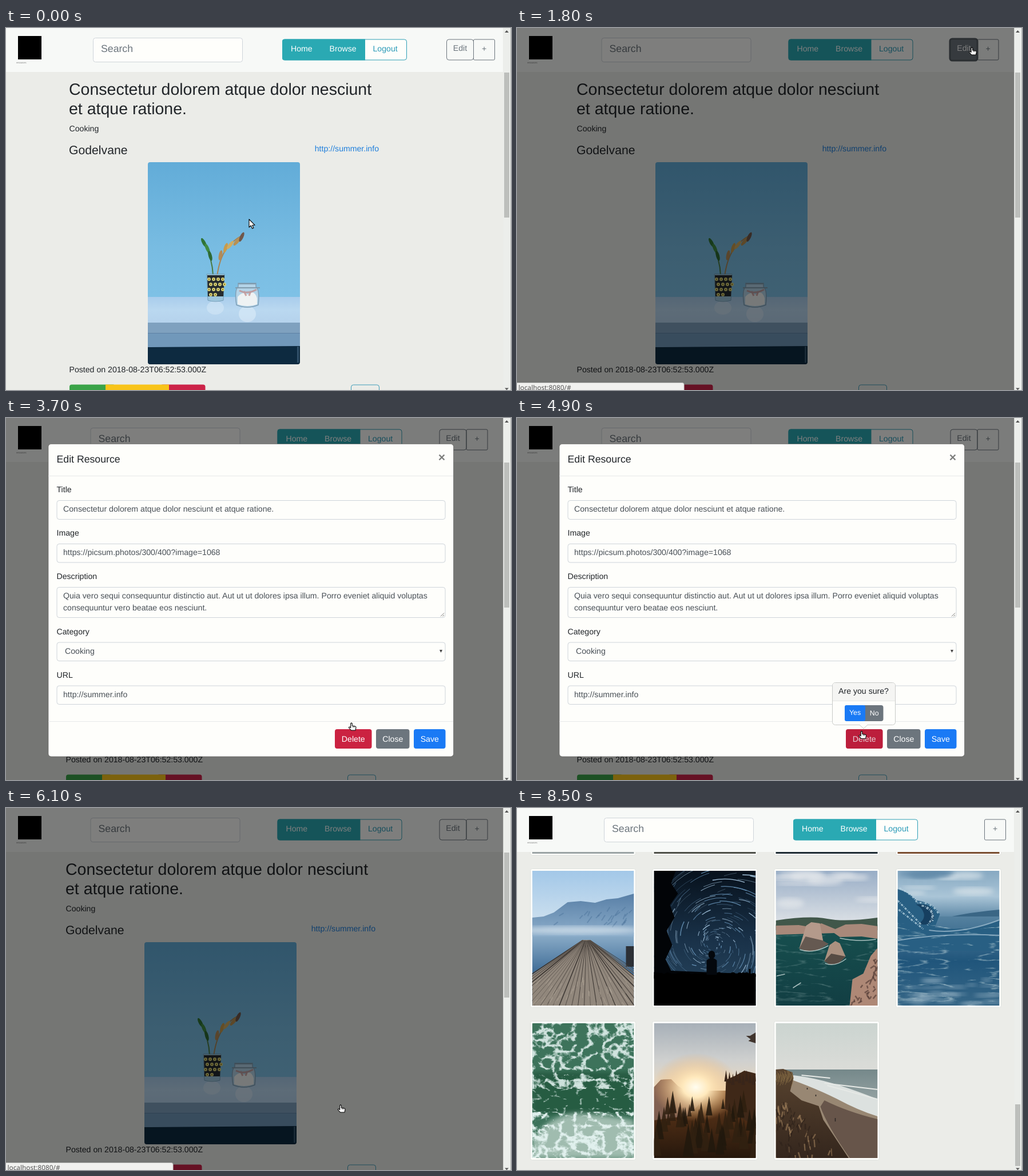
Recreate the animation shown at these times as an HTML page. Size 883 by 634 pixels, loop 8700 ms.

```html
<!DOCTYPE html>
<html lang="en">
<head>
<meta charset="utf-8">
<title>Delete a resource</title>
<style>
html, body { margin: 0; width: 100%; height: 100%; overflow: hidden; background: #ebece8 }
body > svg { display: block; font-family: "Liberation Sans", Arial, sans-serif; text-rendering: geometricPrecision }
.mid { text-anchor: middle }
.end { text-anchor: end }
</style>
</head>
<body>
<script>
const PAPER = '#fefefb', PAGE = '#ebece8', INK = '#212529', GREY = '#6c757d', TEAL = '#2aa9b3';
const BODY = 14.14, LARGE = 17.7;

let seed = 7;
const rnd = (lo = 0, hi = 1) => lo + (hi - lo) * (seed = seed * 16807 % 2147483647) / 2147483647;
const times = (n, fn) => Array.from({ length: n }, (_, i) => fn(i)).join('');

const rect = (x, y, w, h, fill, more = '') => `<rect x="${x}" y="${y}" width="${w}" height="${h}" fill="${fill}" ${more}/>`;
const box = (x, y, w, h, fill, stroke, rx = 4) => rect(x + .5, y + .5, w - 1, h - 1, fill, `rx="${rx}" stroke="${stroke}"`);
const text = (x, y, str, fill = INK, size = BODY, more = '') => `<text x="${x}" y="${y}" font-size="${size}" fill="${fill}" ${more}>${str}</text>`;
const shape = (d, fill, more = '') => `<path d="${d}" fill="${fill}" ${more}/>`;
const line = (d, stroke, width = 1, more = '') => `<path d="${d}" fill="none" stroke="${stroke}" stroke-width="${width}" ${more}/>`;
const oval = (x, y, rx, ry, fill, more = '') => `<ellipse cx="${x}" cy="${y}" rx="${rx}" ry="${ry}" fill="${fill}" ${more}/>`;
const group = (id, content, more = '') => `<g id="${id}" ${more}>${content}</g>`;
const picture = (x, y, w, h, content) => `<svg x="${x}" y="${y}" width="${w}" height="${h}">${content}</svg>`;
const button = (x, y, w, h, fill, label, size = BODY) =>
  rect(x, y, w, h, fill, 'rx="4"') + text(x + w / 2, y + h / 2 + size * .32, label, '#fff', size, 'class="mid"');
const fade = (id, ...colors) => `<linearGradient id="${id}" x2="0" y2="1">${
  colors.map((c, i) => `<stop offset="${i / (colors.length - 1)}" stop-color="${c}"/>`).join('')}</linearGradient>`;
const foam = (id, freq, gain, bias) => `<filter id="${id}" x="0" y="0" width="1" height="1" color-interpolation-filters="sRGB">
  <feTurbulence type="turbulence" baseFrequency="${freq}" numOctaves="4" seed="4"/>
  <feColorMatrix values="0 0 0 0 .88 0 0 0 0 .94 0 0 0 0 .93 ${-gain} 0 0 0 ${bias}"/></filter>`;

const defs = `<defs>
  ${fade('wall', '#62acd8', '#78bce2', '#83c5e9')}${fade('table', '#a9cdec', '#bad8f0', '#b5d2ec')}
  ${fade('haze', '#a3c8e8', '#d6e5f0')}${fade('lake', '#8fb0cb', '#45719a', '#2c5680')}${fade('ridge', '#587fa6', '#8eafcc')}
  ${fade('night', '#07111c', '#193148', '#294861')}${fade('cloudy', '#98adc6', '#dbe0e5')}${fade('bay', '#17504f', '#123e43')}
  ${fade('storm', '#87a9c2', '#aac5d7', '#4c7a9b')}${fade('swell', '#55819f', '#20557b', '#376787')}
  ${fade('dusk', '#a7b0b8', '#cfd0cf', '#f3dcba')}${fade('valley', '#9b6840', '#4c2c15', '#25170c')}
  ${fade('fog', '#cbd4d0', '#dbdcd8')}${fade('sea', '#75888a', '#a3afae')}${fade('dune', '#58432f', '#34261d')}
  <radialGradient id="sun"><stop stop-color="#fffdf0"/><stop offset=".3" stop-color="#ffe9bd"/><stop offset="1" stop-color="#f0b068" stop-opacity="0"/></radialGradient>
  ${foam('surf', '.035 .06', 8, 1.5)}${foam('froth', '.04 .05', 6, 1.9)}${foam('ripple', '.012 .07', 6, 1.1)}
  <filter id="soft"><feGaussianBlur stdDeviation="4"/></filter>
  <filter id="lift"><feDropShadow dx="0" dy="0" stdDeviation="3" flood-opacity=".35"/></filter>
</defs>`;

function plantPhoto() {
  const leaf = (x, y, turn, fill) => oval(0, 0, 3, 9, fill, `transform="translate(${x} ${y}) rotate(${turn})"`);
  return rect(0, 0, 266, 300, 'url(#wall)', 'rx="4"') + rect(0, 300, 266, 54, '#0d2a40', 'rx="4"')
    + rect(0, 236, 266, 46, 'url(#table)') + rect(0, 281, 266, 19, '#7fa1bf') + line('M0 300H266', '#54799c', 1.5)
    + shape('M0 300H266V322L0 324Z', '#7198ba') + rect(261, 323, 3, 28, '#315069')
    + oval(118, 255, 15, 12, '#d8e9f7', 'opacity=".5"') + oval(174, 266, 15, 14, '#dcecf8', 'opacity=".6"')
    + line('M114 198Q113 170 98 139', '#4a7a42', 2) + line('M121 200Q125 170 136 154T165 128', '#a88455', 2)
    + leaf(98, 141, -28, '#2f7436') + leaf(104, 151, -24, '#3f8a43') + leaf(109, 164, -15, '#2d6a35')
    + leaf(127, 163, 12, '#b38a57') + leaf(136, 150, 18, '#c79b4c') + leaf(144, 145, 38, '#d0ad62')
    + leaf(156, 139, 42, '#b99152') + leaf(164, 131, 25, '#70574a')
    + shape('M103 196H134L132 242Q118 246 105 242Z', '#9cc5dc', 'stroke="#6d98b2" opacity=".9"')
    + shape('M104 198H134L132 235H105Z', '#252b2e')
    + times(14, i => oval(107 + i % 4 * 8 + (i >> 2) % 2 * 3, 205 + (i >> 2) * 9, 3, 3, '#d7d27c') + oval(107 + i % 4 * 8 + (i >> 2) % 2 * 3, 205 + (i >> 2) * 9, 1.2, 1.2, '#8d7a25'))
    + shape('M158 212H189V218Q196 224 193 250Q174 258 155 250Q151 224 158 218Z', '#b3d3e7', 'stroke="#7f9fb7" stroke-width="1.5"')
    + shape('M157 236Q166 225 175 232Q186 222 191 238V249Q174 255 157 249Z', '#eef2f3')
    + line('M160 225Q174 232 190 223M168 226L172 234M180 226L177 234', '#c08c8b', 3, 'opacity=".75"') + line('M153 220H196M158 213H189', '#819cae', 2);
}

const dockPhoto = () => rect(0, 0, 178, 110, 'url(#haze)') + rect(0, 108, 178, 130, 'url(#lake)')
  + shape('M0 82L20 80 38 73 62 55 85 53 110 56 130 50 150 48 178 40V115H0Z', 'url(#ridge)')
  + times(24, () => { const x = rnd(45, 175), y = rnd(62, 92); return line(`M${x} ${y}l${rnd(-9, -3)} ${rnd(4, 12)}`, '#456d94', 2, 'opacity=".4"'); })
  + oval(80, 104, 110, 7, '#d0dfea', 'filter="url(#soft)" opacity=".8"')
  + rect(164, 132, 14, 36, '#2c3036') + shape('M88 121H102L178 183V237H0V182Z', '#91877c')
  + times(34, i => line(`M${88 + i * .42} 122L${-85 + i * 11} 237`, i % 3 ? '#625a53' : '#393430', rnd(.6, 1.8)))
  + times(60, () => { const x = rnd(0, 178), y = rnd(185, 237); return line(`M${x} ${y}l${(x - 95) * .1} 9`, '#c6bbaa', .8, 'opacity=".6"'); });

function starPhoto() {
  const cx = 105, cy = 128;
  const trail = () => {
    const r = rnd(8, 215), a = rnd(0, 6.28), b = a + rnd(.12, .5);
    const at = (v, k) => `${(cx + k * Math.cos(v)).toFixed(1)} ${(cy + k * Math.sin(v)).toFixed(1)}`;
    return line(`M${at(a, r)}A${r} ${r} 0 0 1 ${at(b, r * 1.08)}`, rnd() < .5 ? '#a9c9e2' : '#6793b8', rnd(.5, 1.5), `opacity="${rnd(.3, .95).toFixed(2)}"`);
  };
  return rect(0, 0, 178, 237, 'url(#night)') + times(460, trail)
    + shape('M0 0H38L30 22 42 40 28 60 36 82 22 105 32 130 20 155 30 175 178 181V237H0Z', '#020407')
    + times(30, i => oval(i * 6, 183, 5, rnd(2, 6), '#000')) + rect(0, 183, 178, 54, '#000')
    + oval(101, 147, 6, 7, '#04080d') + shape('M92 182V157Q101 148 110 157V182Z', '#04080d') + rect(166, 172, 3, 12, '#000');
}

const coastPhoto = () => rect(0, 0, 178, 90, 'url(#cloudy)')
  + times(9, () => oval(rnd(0, 178), rnd(5, 65), rnd(20, 45), rnd(4, 10), '#e6e9ec', 'filter="url(#soft)" opacity=".65"'))
  + rect(0, 94, 178, 143, 'url(#bay)') + rect(0, 112, 178, 125, '#fff', 'filter="url(#ripple)" opacity=".22"')
  + shape('M0 87Q60 78 90 84T178 82V104H0Z', '#41574a')
  + shape('M0 96L40 95 58 98 80 92 104 102 122 94 150 93 178 97V119L150 115 112 116 102 109 0 112Z', '#a8897a')
  + shape('M41 136L53 96 62 90 77 92 83 124 92 128 75 138 55 141Z', '#b49a8b') + shape('M41 136L52 115 82 122 92 128 75 138 55 141Z', '#655951')
  + shape('M85 158L94 130 104 123 112 127 122 150 110 162 94 164Z', '#aa9180') + shape('M85 158L97 145 122 150 110 162 94 164Z', '#574c44')
  + shape('M129 237L134 190 153 180 166 149 178 135V237Z', '#ae8876')
  + times(35, () => { const y = rnd(150, 235), x = rnd(178 - (y - 140) * .5, 178); return line(`M${x} ${y}l${rnd(-7, 5)} ${rnd(3, 8)}`, '#594139', 2.5, 'opacity=".7"'); })
  + line('M42 138Q65 146 92 131M86 162Q104 169 123 154M112 118Q145 125 175 120M2 184L16 181M30 205L44 196', '#dbe7e5', 1.5, 'opacity=".75"');

const wavePhoto = () => rect(0, 0, 178, 90, 'url(#storm)')
  + times(9, () => oval(rnd(30, 178), rnd(0, 40), rnd(18, 45), rnd(3, 8), rnd() < .5 ? '#d8e3e9' : '#628aa9', 'filter="url(#soft)" opacity=".75"'))
  + shape('M85 82Q130 72 178 68V90H80Z', '#3a6685') + rect(0, 80, 178, 157, 'url(#swell)')
  + shape('M0 32Q22 38 33 52Q62 55 74 76L65 99Q120 108 178 87V140H0Z', '#285f83')
  + shape('M32 59Q63 55 64 83Q58 98 36 93Q48 86 46 75Q43 64 32 59Z', '#163f60')
  + line('M3 30Q27 42 34 56Q61 54 72 76M42 61Q66 65 61 88M50 65Q70 75 52 95M0 52L42 95M2 68L45 102', '#b9d3e1', 3, 'stroke-dasharray="4 2 1 2" opacity=".75"')
  + rect(0, 92, 178, 145, '#fff', 'filter="url(#ripple)" opacity=".5"')
  + line('M55 104Q110 112 178 86M0 122Q80 108 178 113', '#a8c4d5', 2, 'opacity=".7"')
  + times(28, () => oval(rnd(0, 178), rnd(190, 236), rnd(8, 25), rnd(2, 4), '#9db7c8', 'filter="url(#soft)" opacity=".55"'));

const foamPhoto = () => rect(0, 0, 178, 237, '#3d735b') + rect(0, 85, 178, 75, '#285b43', 'filter="url(#soft)"')
  + rect(0, 0, 178, 115, '#fff', 'filter="url(#froth)" opacity=".9"') + rect(0, 90, 178, 75, '#fff', 'filter="url(#surf)" opacity=".65"')
  + shape('M0 205Q35 155 85 158T178 170V237H0Z', '#d6e4dd', 'filter="url(#soft)" opacity=".65"') + rect(0, 155, 178, 82, '#fff', 'filter="url(#froth)"');

const sunsetPhoto = () => rect(0, 0, 178, 130, 'url(#dusk)') + shape('M0 112L12 99 30 98 42 110 55 118 130 118 178 105V237H0Z', 'url(#valley)')
  + shape('M0 112L12 99 30 98 42 110 55 118 90 130 60 162 0 170Z', '#87675a', 'opacity=".85"')
  + oval(73, 112, 75, 60, 'url(#sun)') + shape('M124 150L126 99 142 92 158 83 178 88V180Z', '#3f2818')
  + times(46, i => {
    const x = rnd(0, 178), y = 150 + i * 1.9, h = rnd(17, 38) + i * .5;
    return shape(`M${x} ${y - h}l${h * .17} ${h}h${-h * .34}Z`, i % 2 ? '#302010' : '#22180d', 'opacity=".88"');
  }) + times(10, i => shape(`M${126 + i * 6} ${82 + i % 3 * 3}l3 20h-6Z`, '#38251a'))
  + shape('M178 16L168 22 161 22 169 28 165 31 178 35Z', '#40342d');

const beachPhoto = () => rect(0, 0, 178, 82, 'url(#fog)') + rect(0, 81, 178, 80, 'url(#sea)')
  + shape('M30 91Q90 97 178 133V178Q100 139 28 99Z', '#dce1df') + line('M45 91L95 96M85 105L178 116M90 109L178 133', '#e6e9e6', 2)
  + shape('M28 99Q72 115 106 132Q145 153 178 163V237H0V100Z', '#988773')
  + shape('M85 135Q125 155 178 168V237H130Q90 180 78 146Z', '#67554a')
  + shape('M0 81L13 80 29 86 31 96 25 119 45 135 75 145 83 169 128 237H0Z', 'url(#dune)')
  + times(85, () => { const y = rnd(136, 237), x = rnd(0, (y - 105) * .85); return line(`M${x} ${y}l${rnd(-5, 4)} ${rnd(5, 14)}`, rnd() < .55 ? '#a0805c' : '#2c211a', rnd(1, 3), 'opacity=".6"'); })
  + times(26, i => line(`M${i * 1.15} ${rnd(83, 90)}q4 8 -2 ${rnd(12, 23)}`, '#8b7048', 1, 'opacity=".65"'))
  + line('M104 166v6M55 113v3M70 125v3', '#2b2724', 1.5);

const frame = (x, y) => box(x, y, 185, 244, PAPER, '#dfe2df', 3);
const card = (i, photo) => {
  const x = 23 + i % 4 * 213, y = i < 4 ? 106 : 373;
  return frame(x, y) + picture(x + 3.5, y + 4, 178, 236, photo());
};

const resource = text(110, 117, 'Consectetur dolorem atque dolor nesciunt', INK, 28.5) + text(110, 150.5, 'et atque ratione.', INK, 28.5)
  + text(110.5, 181, 'Cooking') + text(110, 220.5, 'Godelvane', INK, 21.2) + text(652, 216, 'http://summer.info', '#1f7fdc', BODY, 'class="end"')
  + picture(248, 235, 266.5, 354.5, plantPhoto()) + text(110.5, 603, 'Posted on 2018-08-23T06:52:53.000Z')
  + rect(111, 624.5, 80, 20, '#3aa348', 'rx="4"') + rect(270, 624.5, 78.5, 20, '#cc2348', 'rx="4"') + rect(174, 624.5, 111, 20, '#f8c41a')
  + box(603, 624.5, 50, 30, 'none', '#3e9cb8');

const grid = ['#9aa3a4', '#4d4f48', '#1d2b33', '#7a4d30'].map((c, i) => frame(23 + i * 213, -161) + rect(26.5 + i * 213, 70, 178, 10, c)).join('')
  + group('halo', rect(435, 372.5, 213, 245, PAGE, 'filter="url(#lift)"'))
  + [dockPhoto, starPhoto, coastPhoto, wavePhoto, foamPhoto, sunsetPhoto, beachPhoto].map((p, i) => card(i, p)).join('')
  + group('caption', ['GodelvaneSed', 'quod repellat', 'necessitatibus.'].map((s, i) => text(541, 527 + i * 21.1, s, '#fff', LARGE, 'class="mid"')).join(''));

const header = rect(0, 0, 869, 77, '#f7f9f7') + rect(21, 14, 41, 41, '#000') + text(18, 62, 'resources', '#777', 4)
  + group('search', box(152, 17, 262, 43, PAPER, '#ced4da') + text(166, 42, 'Search', GREY, LARGE))
  + group('nav', box(483, 19.5, 218, 37, PAPER, '#2f9fb5') + shape('M628 19.5H487Q483 19.5 483 23.5V52.5Q483 56.5 487 56.5H628Z', TEAL)
    + text(498, 41, 'Home', '#fff') + text(565.5, 41, 'Browse', '#fff') + text(641.5, 41, 'Logout', '#2b9bb8'))
  + group('tools', box(817, 19.5, 38, 37, 'none', GREY, 2) + text(836, 41, '+', GREY, BODY, 'class="mid"')
    + group('edit', box(770, 19.5, 48, 37, 'none', GREY) + rect(770, 19.5, 47.5, 37, GREY, 'id="editFill" rx="4"')
      + rect(769.5, 19, 48, 38, 'none', 'id="ring" stroke="#555c62" stroke-width="3" rx="4"') + text(794, 39.5, 'Edit', GREY, BODY, 'id="editLabel" class="mid"')));

const field = (y, h, label, value, x = 100) => text(88.5, y - 14, label) + box(88.5, y, 680, h, PAPER, '#ced4da')
  + [].concat(value).map((s, i) => text(x, y + 20 + i * 21, s, '#495057')).join('');

const popover = rect(551.5, 463.5, 110, 74, PAPER, 'rx="5" stroke="#c9cac8"') + shape('M552 495V468Q552 464 556 464H657Q661 464 661 468V495Z', '#f5f5f3')
  + line('M552 495.5H661', '#e6e7e5') + shape('M599 537L606 544 613 537Z', PAPER) + line('M599 537.5L606 544 613 537.5', '#c9cac8')
  + text(606, 483, 'Are you sure?', INK, BODY, 'class="mid"') + button(609, 503, 31.5, 28, GREY, 'No', 12.4) + rect(607, 503, 6, 28, GREY)
  + rect(573, 503, 36, 28, '#1a7af5', 'id="yes" rx="3"') + text(591, 520, 'Yes', '#fff', 12.4, 'class="mid"');

const modal = rect(74, 45.5, 708.5, 547.5, PAPER, 'rx="5" stroke="#5c5c59" stroke-width=".6"') + line('M74 101.5H782M74 531.5H782', '#e7e9e9')
  + text(88.5, 77.5, 'Edit Resource', INK, LARGE) + text(762, 75.5, '×', '#7d7e7c', 21.2, 'class="mid" font-weight="bold"')
  + field(144, 34, 'Title', 'Consectetur dolorem atque dolor nesciunt et atque ratione.')
  + field(220, 33.5, 'Image', 'https://picsum.photos/300/400?image=1068')
  + field(296, 54, 'Description', ['Quia vero sequi consequuntur distinctio aut. Aut ut ut dolores ipsa illum. Porro eveniet aliquid voluptas', 'consequuntur vero beatae eos nesciunt.'])
  + line('M760 347.5L766 341.5M763.5 347.5L766 345', '#777')
  + field(392.5, 33.5, 'Category', 'Cooking', 103) + shape('M758 406H763L760.5 411Z', '#444')
  + field(468.5, 33.5, 'URL', 'http://summer.info')
  + button(575, 545, 64.5, 34, '#cb2241', 'Delete') + rect(575, 545, 64.5, 34, '#7d1028', 'id="deleteShade" rx="4"')
  + button(647, 545, 58.5, 34, GREY, 'Close') + button(713, 545, 55.5, 34, '#1a7af5', 'Save') + group('popover', popover);

const scrollbar = rect(869.5, 0, 14, 634, '#eceeeb') + rect(871, 78, 9, 254, '#bdbfbc', 'id="thumb"')
  + shape('M872 8L875.5 4 879 8Z', '#555') + shape('M872 630.5H879L875.5 634Z', '#555') + rect(882, 0, 1, 634, '#b4b6b4');

const status = rect(-2, 621.5, 294, 20, '#f1f1ef', 'rx="3" stroke="#c6c7c5"') + text(2.5, 634, 'localhost:8080/#', '#555', 11.8, 'font-family="Noto Sans, sans-serif"');

const outline = 'stroke="#000" stroke-width="1.1" stroke-linejoin="round"';
const pointers = group('arrow', shape('M0 0V14L3.3 11 5.6 16.3 7.9 15.3 5.7 10.2H10Z', '#fff', outline))
  + group('hand', shape('M-1.3 1Q0-.8 1.3 1V5L6 5.8Q8 6 8 8L7 13H-.5L-4.5 8.5Q-4.5 6.5-2.8 7.2L-1.3 8.5Z', '#fff', outline) + line('M2.8 5.5V8M5 6V8', '#000', .8))
  + group('beam', line('M-3 0H3M0 0V11M-3 11H3', '#fff', 3) + line('M-3 0H3M0 0V11M-3 11H3', '#111', 1.2));

document.body.innerHTML = `<svg width="883" height="634" viewBox="0 0 883 634">${defs}${rect(0, 0, 883, 634, PAGE)}
  ${group('resource', resource)}${group('grid', grid)}${header}${rect(0, 0, 869.5, 634, '#000', 'id="backdrop"')}
  ${group('modal', modal)}${scrollbar}${group('status', status)}${group('pointer', pointers)}</svg>`;

const LOOP = 8700, STEP = 100;
// time, x, y
const route = [[200, 425, 335], [400, 532, 246], [500, 532, 246], [900, 772, 54], [1100, 796, 34], [2200, 795, 34], [2300, 698, 91],
  [2400, 698, 91], [2600, 647, 156], [2700, 647, 156], [2900, 607, 267], [3000, 607, 267], [3700, 604, 534], [3900, 606, 556],
  [4800, 606, 556], [5200, 592, 526], [5300, 592, 526], [5500, 585, 520], [6500, 585, 520], [6600, 585, 517], [6800, 585, 517],
  [7400, 562, 368], [7900, 94, 0], [8000, 92, -30]];

const el = id => document.getElementById(id);
const set = (id, name, value) => el(id).setAttribute(name, value);
const alpha = (id, value) => set(id, 'opacity', value);
const shift = (id, x, y = 0) => set(id, 'transform', `translate(${x} ${y})`);

function pointerAt(t) {
  const i = route.findIndex(k => k[0] > t);
  if (i < 1) return route.at(i).slice(1);
  const [a, x, y] = route[i - 1], [b, u, v] = route[i], p = (t - a) / (b - a);
  return [x + (u - x) * p, y + (v - y) * p];
}

function draw(t) {
  const ramp = (a, b) => Math.min(1, Math.max(0, (t - a) / (b - a)));
  const during = (a, b) => +(t >= a && t < b);
  const listed = during(6300, LOOP), locked = during(1700, 6300);

  alpha('resource', 1 - listed);
  alpha('grid', listed);
  alpha('edit', 1 - listed);
  set('thumb', 'y', listed ? 519 : 78);
  set('thumb', 'height', listed ? 108 : 254);
  shift('resource', -6 * locked);
  shift('search', -4.5 * locked);
  shift('nav', -8.5 * locked);
  shift('tools', -12.5 * locked);

  const hot = during(900, 1900);
  alpha('editFill', hot);
  set('editLabel', 'fill', hot ? '#fff' : GREY);
  alpha('ring', during(1500, 2300));

  alpha('backdrop', .5 * (ramp(1650, 1800) - ramp(6250, 6400)));
  alpha('modal', ramp(1800, 1950) - ramp(5950, 6100));
  shift('modal', 0, -137 * ((1 - ramp(1790, 2090)) ** 1.7 + ramp(5950, 6250) ** 1.7));
  alpha('popover', ramp(4150, 4400));
  alpha('deleteShade', .2 * during(3800, 5000));
  set('yes', 'fill', t >= 5200 ? '#1f64b6' : '#1a7af5');
  alpha('status', ramp(900, 1100) - ramp(1900, 2200) + ramp(5300, 5500) - ramp(6400, 6700));

  alpha('halo', ramp(6300, 6500) - ramp(7400, 7700));
  alpha('caption', ramp(6400, 6700) - ramp(7400, 7700));

  const beam = during(6500, 7000), hand = during(900, 1900) + during(3600, 6500) + during(7000, 7500);
  alpha('beam', beam);
  alpha('hand', hand);
  alpha('arrow', 1 - beam - hand);
  shift('pointer', ...pointerAt(t));
}

let shown = -1;
function tick(now) {
  const t = Math.floor(now % LOOP / STEP) * STEP;
  if (t !== shown) draw(shown = t);
  requestAnimationFrame(tick);
}
tick(performance.now());
</script>
</body>
</html>
```
